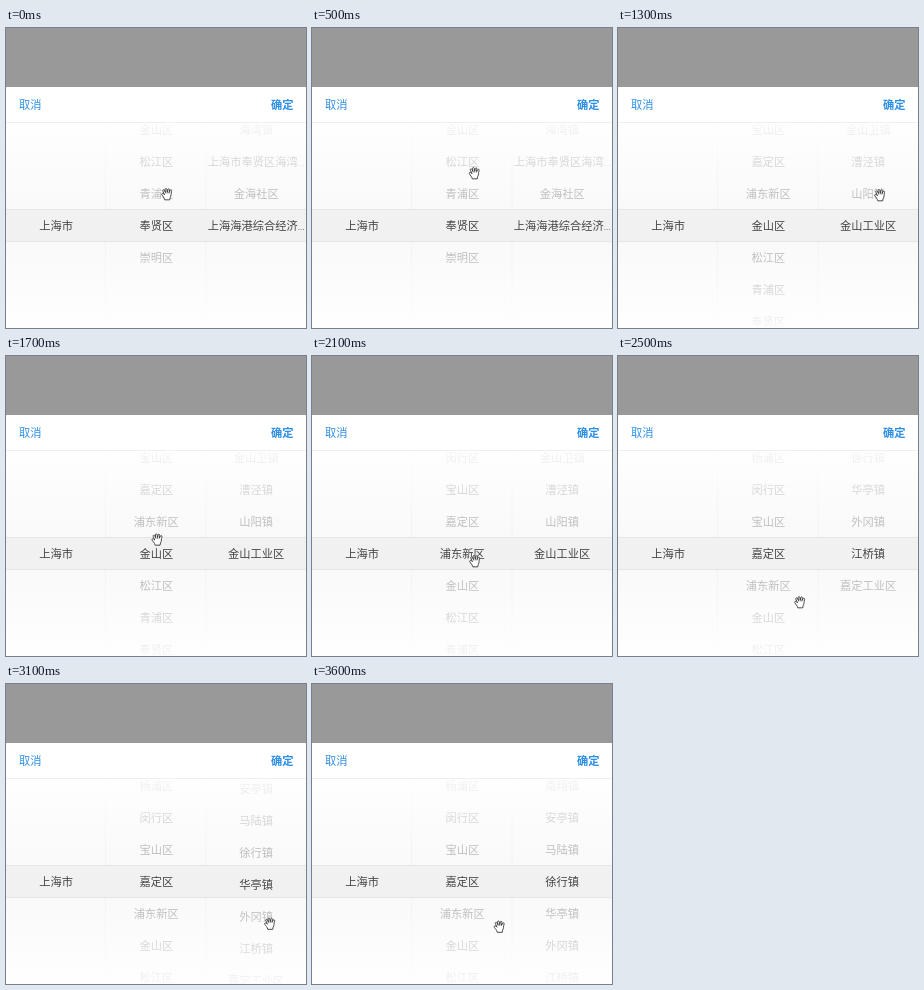
An HTML page that plays this animation: 300 by 300 pixels, repeating every 4100 ms.

```html
<!DOCTYPE html>
<html lang="zh-CN">
<head>
<meta charset="utf-8">
<style>
  html, body { margin: 0; width: 100%; height: 100%; overflow: hidden; background: #fff; }
  svg { display: block; width: 100vw; height: 100vh; }
  text { font: 11.25px "Noto Sans CJK SC", "Noto Sans CJK", "Noto Sans", sans-serif; fill: #444; text-anchor: middle; }
  .action { fill: #2f8fe6; }
  .bold { font-weight: 700; }
  .dots { font: 8px "Liberation Sans", sans-serif; }
</style>
</head>
<body>
<svg viewBox="0 0 300 300">
  <defs>
    <linearGradient id="fade" x1="0" y1="0" x2="0" y2="1">
      <stop offset="0" stop-color="#fff" stop-opacity=".95"/>
      <stop offset="1" stop-color="#fff" stop-opacity=".6"/>
    </linearGradient>
    <clipPath id="wheel"><path d="M0 95H300V300H0Z"/></clipPath>
  </defs>
  <rect width="300" height="300" fill="#f1f1f1"/>
  <path d="M99.5 95V300M200 95V300" stroke="#dfdfdf"/>
  <rect y="181" width="300" height="33" fill="#f1f1f1"/>
  <g clip-path="url(#wheel)">
    <text x="50.2" y="201.6">上海市</text>
    <g id="districts"></g>
    <g id="towns"></g>
  </g>
  <rect y="95" width="300" height="86" fill="url(#fade)"/>
  <rect width="300" height="86" fill="url(#fade)" transform="translate(0 300) scale(1 -1)"/>
  <path d="M0 181.5H300M0 213.5H300" stroke="#e6e6e6"/>
  <rect width="300" height="59" fill="#999"/>
  <rect y="59" width="300" height="36" fill="#fff"/>
  <path d="M0 94.5H300" stroke="#efefef"/>
  <text class="action" x="24.2" y="80.5">取消</text>
  <text class="action bold" x="276.2" y="80.5">确定</text>
  <g id="hand" fill="#fff" stroke="#333" stroke-linejoin="round" stroke-linecap="round">
    <path d="M-2.6 6.2C-3 4-4.8 2.8-5.9.9C-6.6-.4-5-1.4-3.9-.2L-2.9.8L-4.7-3.3C-5.2-4.7-3.5-5.4-2.9-4.1L-1.8-1.8L-2.2-5C-2.3-6.5-.5-6.7-.2-5.2L.3-2.1L.9-5C1.2-6.4 2.9-6.1 2.7-4.6L2.4-1.7L3.5-3.7C4.2-4.9 5.7-4.2 5.2-2.8C4.3-.1 5 2 3.6 4.1L3.2 6.2Z"/>
    <path d="M-1.8-1.8L-1.5-1M.3-2.1V-1.1M2.4-1.7L2.2-1" fill="none" stroke-width=".7"/>
  </g>
</svg>
<script>
const LOOP = 4100, STEP = 100, REST = 3600;
const ROW = 32, CENTER = 197, DRAG = 600;

const districts = "黄浦区 徐汇区 长宁区 静安区 普陀区 虹口区 杨浦区 闵行区 宝山区 嘉定区 浦东新区 金山区 松江区 青浦区 奉贤区 崇明区".split(" ");
const fengxian = "南桥镇 奉城镇 庄行镇 金汇镇 四团镇 青村镇 柘林镇 海湾镇 上海市奉贤区海湾~ 金海社区 上海海港综合经济~".split(" ");
const jinshan = "石化街道 朱泾镇 枫泾镇 张堰镇 亭林镇 吕巷镇 廊下镇 金山卫镇 漕泾镇 山阳镇 金山工业区".split(" ");
const jiading = "新成路街道 真新街道 菊园新区 嘉定镇街道 南翔镇 安亭镇 马陆镇 徐行镇 华亭镇 外冈镇 江桥镇 嘉定工业区".split(" ");

// Where the hand turns: time, x, y
const handPath = [[0, 161, 166], [500, 162.5, 145], [900, 164, 233], [1300, 262, 167], [1600, 146, 189],
  [1900, 162, 172], [2100, 163, 205], [2500, 182, 246], [2800, 260, 172], [3100, 264, 239.5], [3600, 187.5, 242.5]];

const el = id => document.getElementById(id);

// Rows travelled by a drag that slows to a stop
function drag(t, start, rows) {
  const p = Math.min(1, Math.max(0, (t - start) / DRAG));
  return rows * ROW * Math.sin(p * Math.PI / 2);
}

function handAt(t) {
  const i = Math.max(1, handPath.findIndex(k => k[0] >= t));
  const [t0, x0, y0] = handPath[i - 1], [t1, x1, y1] = handPath[i];
  const p = (t - t0) / (t1 - t0);
  return `${x0 + (x1 - x0) * p} ${y0 + (y1 - y0) * p}`;
}

function wheel(items, x, index, offset) {
  return items.map((name, i) => {
    const y = CENTER + (i - index) * ROW + offset;
    const label = name.replace("~", '<tspan class="dots">...</tspan>');
    return `<text x="${x}" y="${y + 4.6}">${label}</text>`;
  }).join("");
}

function draw(t) {
  const towns = t < 1100 ? fengxian : t < 2400 ? jinshan : jiading;
  el("districts").innerHTML = wheel(districts, 150.3, 14, drag(t, 500, 3) + drag(t, 1900, 2));
  el("towns").innerHTML = wheel(towns, 250.2, 10, drag(t, 2800, 3));
  el("hand").setAttribute("transform", `translate(${handAt(t)}) scale(.88)`);
}

const start = performance.now();
let shown = -1;
function tick() {
  const time = Math.max(0, performance.now() - start) % LOOP;
  const t = Math.min(REST, Math.floor(time / STEP) * STEP);
  if (t !== shown) draw(shown = t);
  requestAnimationFrame(tick);
}
tick();
</script>
</body>
</html>
```
